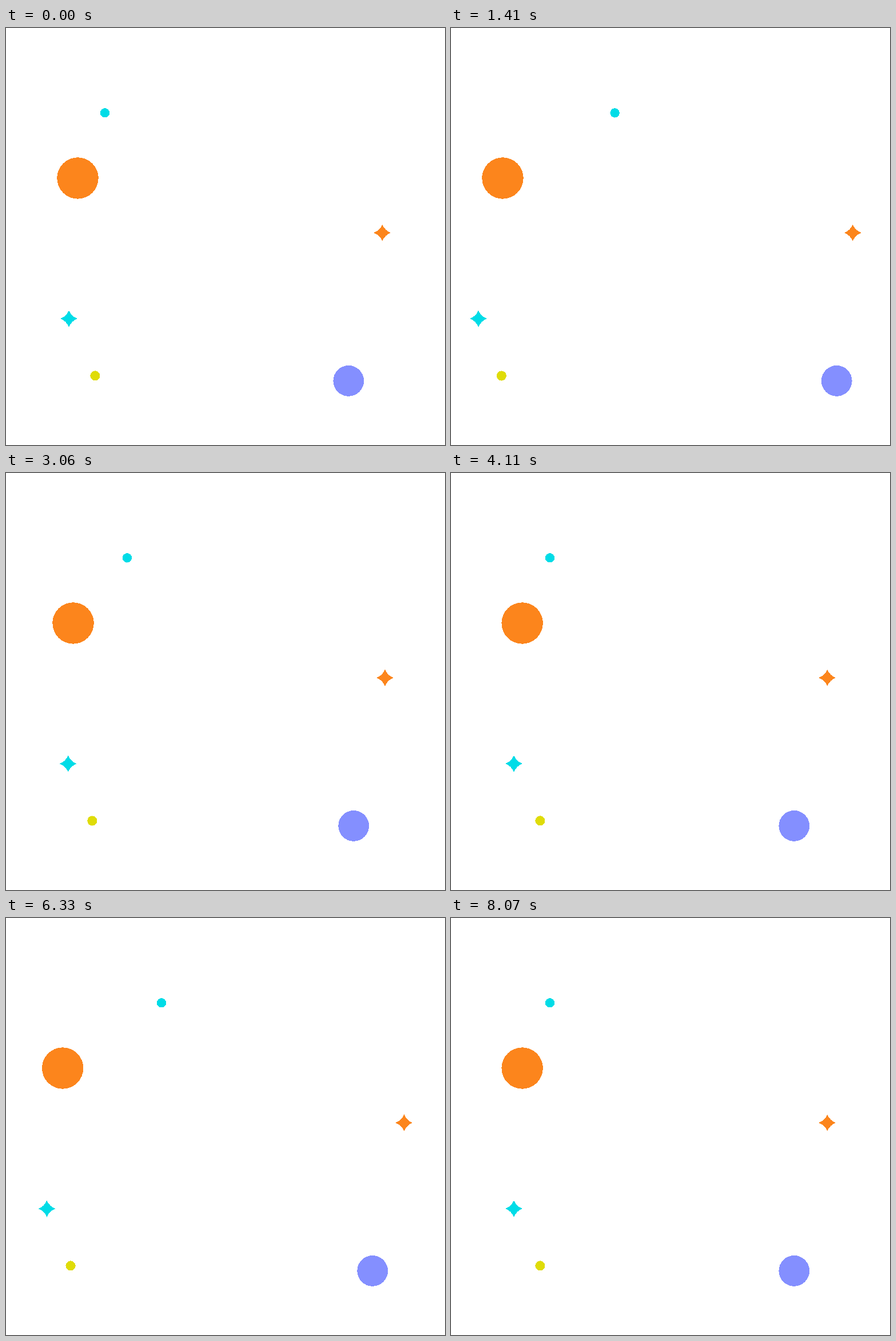
An HTML page that plays this animation: 768 px wide and 729 px high, repeating every 8.1 s.

```html
<!DOCTYPE html>
<html lang="en">
<head>
<meta charset="utf-8">
<title>Drifting shapes</title>
<style>
  html, body { margin: 0; width: 100%; height: 100%; overflow: hidden; background: #fff; }
  svg { display: block; }
</style>
</head>
<body>
<svg width="768" height="729" viewBox="0 0 768 729" shape-rendering="crispEdges"></svg>
<script>
const LOOP = 8100, SWING = 3960, STEP = 30;
const CYAN = '#00dce7', ORANGE = '#fc851c', YELLOW = '#dfdc08', VIOLET = '#848fff';
const STAR = 'M0-14.6Q4.2-4.2 15 0Q4.2 4.2 0 14.6Q-4.2 4.2-15 0Q-4.2-4.2 0-14.6Z';

// Each shape leaves x at `start`, is `shift` away at `peak` and is home at `end` (ms).
// No radius means a star; `launch` is the starting speed of the way back.
const shapes = [
  { x: 173, y: 148.4, r: 8.2, fill: CYAN, shift: 127.2, start: 150, peak: 1730, end: 3832 },
  { x: 125.5, y: 262.5, r: 36.2, fill: ORANGE, shift: -37.2, start: 0, peak: 1650, end: 3660 },
  { x: 658.3, y: 358, fill: ORANGE, shift: 69, start: 770, peak: 1840, end: 3370, launch: 1.15 },
  { x: 110, y: 508.2, fill: CYAN, shift: -68.8, start: 290, peak: 1680, end: 3180 },
  { x: 156, y: 608, r: 8.6, fill: YELLOW, shift: -72.2, start: 250, peak: 1620, end: 3340 },
  { x: 599.3, y: 616.9, r: 26.9, fill: VIOLET, shift: 75.5, start: 60, peak: 1380, end: 3518 }
];

const svg = document.querySelector('svg');
for (const s of shapes) {
  s.node = document.createElementNS(svg.namespaceURI, s.r ? 'circle' : 'path');
  s.node.setAttribute(s.r ? 'r' : 'd', s.r || STAR);
  s.node.setAttribute('fill', s.fill);
  svg.append(s.node);
}

// Cubic ease from 0 to 1 that stops softly; launch 0 also starts softly.
function ease(t, from, to, launch = 0) {
  const u = Math.min(1, Math.max(0, (t - from) / (to - from)));
  return u * (launch + u * (3 - 2 * launch + u * (launch - 2)));
}

function draw(now) {
  const t = Math.floor(now % LOOP / STEP) * STEP % SWING;
  for (const s of shapes) {
    const away = ease(t, s.start, s.peak) - ease(t, s.peak, s.end, s.launch);
    s.node.setAttribute('transform', `translate(${s.x + s.shift * away} ${s.y})`);
  }
}

const origin = performance.now();
function tick() {
  draw(performance.now() - origin);
  requestAnimationFrame(tick);
}
tick();
</script>
</body>
</html>
```
